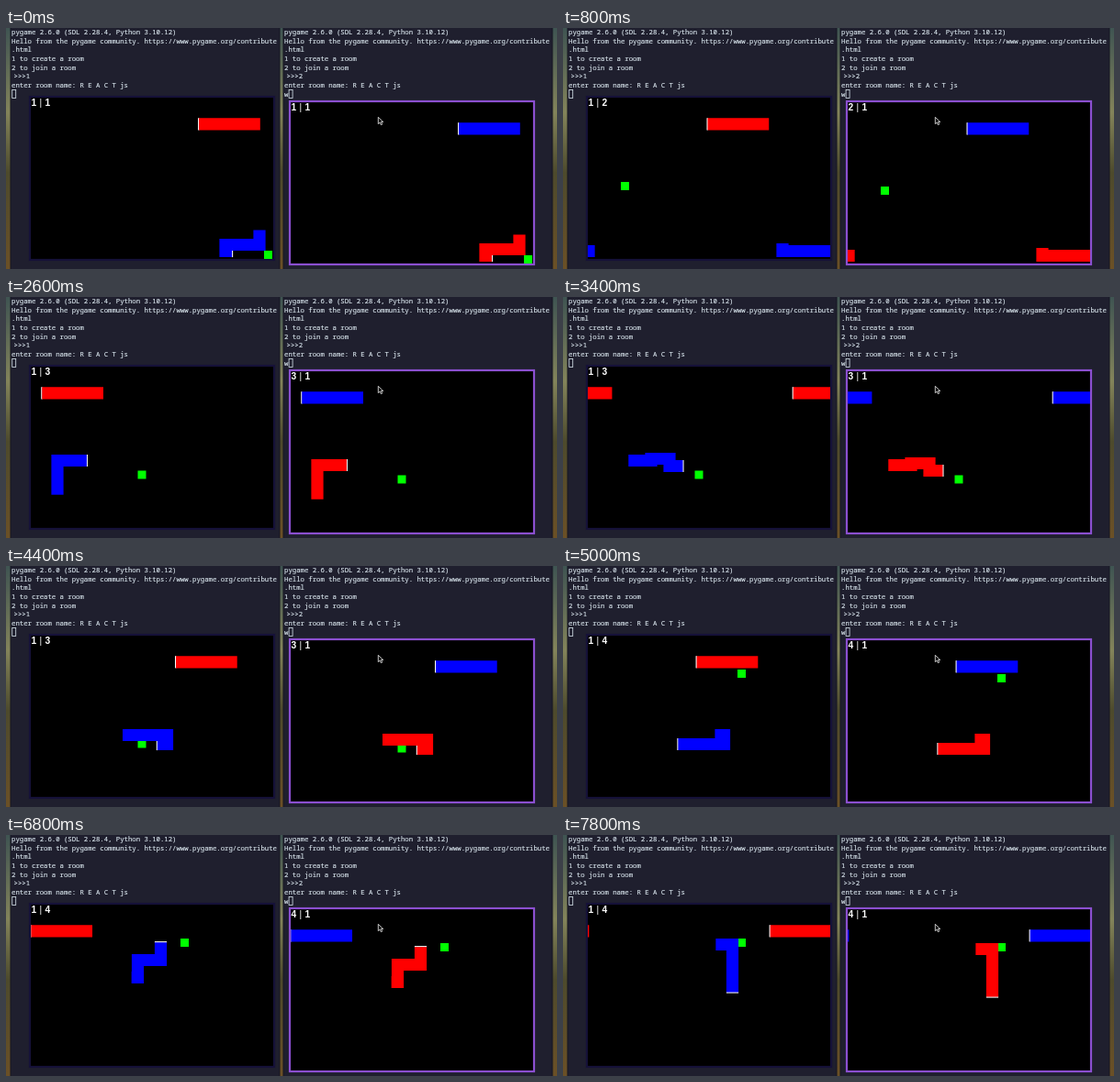
Recreate the animation shown at these times as an HTML page. Size 600 by 263 pixels, loop 8000 ms.

```html
<!DOCTYPE html>
<html lang="en">
<head>
<meta charset="utf-8">
<title>Two player snake</title>
<style>
  html, body { margin: 0; width: 100%; height: 100%; overflow: hidden; background: #1f1f2e; }
  svg { display: block; width: 100vw; height: 100vh; }
  .term { font: 7.31px "Noto Sans Mono", "DejaVu Sans Mono", monospace; fill: #d8e4ec; stroke: #d8e4ec; stroke-width: .14; white-space: pre; }
  .score { font: bold 10.2px "Liberation Sans", Arial, sans-serif; letter-spacing: .2px; fill: #fff; white-space: pre; }
  .bar { font-weight: normal; }
</style>
</head>
<body>
<svg viewBox="0 0 600 263" preserveAspectRatio="none">
  <defs>
    <linearGradient id="wall" x1="0" y1="0" x2="0" y2="1">
      <stop offset="0" stop-color="#3f5452"/>
      <stop offset=".35" stop-color="#83845a"/>
      <stop offset=".6" stop-color="#4d4a2c"/>
      <stop offset="1" stop-color="#6b5026"/>
    </linearGradient>
    <clipPath id="field"><rect x="27" y="76" width="264" height="176"/></clipPath>
  </defs>
  <rect width="600" height="263" fill="url(#wall)"/>
  <g id="terminals"></g>
  <g id="games"></g>
  <path d="M405.3 97.3v7.4l1.8-1.6 1.2 2.6 1.4-.6-1.2-2.6h2.3z" fill="#111" stroke="#eee" stroke-width=".8"/>
</svg>
<script>
const LOOP = 8000, STEP = 200;
const LEFT = 27, WIDTH = 264, SPEED = 65.7, SIZE = 13.2;
const RED = "#f00", BLUE = "#00f";
const $ = id => document.getElementById(id);

// Steering: direction and distance, all at the same speed
const MOVES = "D46 L37 D7 R81 U65 R40 U2 R20 D8 R59.5 D10 L46 U36 L3 U3 R17 U19 R25 U17 R16 D60";
const LEAD = 90.5; // distance already covered when the loop starts
const TURN = { U: [0, -1], D: [0, 1], L: [-1, 0], R: [1, 0] };

let at = { x: 276, y: 190.5, d: 0 };
const route = [at, ...MOVES.split(" ").map(move => {
  const [ux, uy] = TURN[move[0]], n = +move.slice(1);
  return at = { x: at.x + ux * n, y: at.y + uy * n, d: at.d + n };
})];

// Food: x, y, second it appears
const foods = [[281, 243, 0], [63, 168, .6], [143.5, 189.5, 2.4], [190, 113, 4.8]];

function pointAt(d) {
  const i = route.findIndex(p => p.d > d), a = route[i - 1], b = route[i];
  const k = (d - a.d) / (b.d - a.d);
  return [a.x + (b.x - a.x) * k, a.y + (b.y - a.y) * k];
}

// Points from head back to tail
function trail(d, length) {
  const corners = route.filter(p => p.d > d - length && p.d < d).map(p => [p.x, p.y]);
  return [pointAt(d), ...corners.reverse(), pointAt(d - length)];
}

function snake(points, color) {
  const [[hx, hy], [nx, ny]] = points;
  const home = -Math.floor((hx - SIZE / 2 - LEFT) / WIDTH) * WIDTH;
  const ux = Math.sign(hx - nx), uy = Math.sign(hy - ny), r = SIZE / 2, lead = r + .3;
  const cx = hx + ux * lead, cy = hy + uy * lead;
  const eye = `<path d="M${cx - uy * r} ${cy - ux * r}L${cx + uy * r} ${cy + ux * r}" stroke="#fff" stroke-width="1.5"/>`;
  const bodies = [-WIDTH, 0, WIDTH].map(dx =>
    `<polyline transform="translate(${dx} 0)" points="${points.join(" ")}" fill="none"
      stroke="${color}" stroke-width="${SIZE}" stroke-linecap="square"/>`);
  return `<g transform="translate(${home} 0)">${eye}${bodies.join("")}</g>`;
}

function terminal(x, choice, typed) {
  const lines = [
    "pygame 2.6.0 (SDL 2.28.4, Python 3.10.12)",
    "Hello from the pygame community. https://www.pygame.org/contribute",
    ".html", "1 to create a room", "2 to join a room", "&gt;&gt;&gt;" + choice,
    "enter room name: R E A C T js", typed
  ];
  const text = lines.map((s, i) =>
    `<text class="term" x="${x + (s.startsWith("&gt;") ? 2.5 : 0)}" y="${7 + i * 9.67}">${s}</text>`).join("");
  return `<rect x="${x - 1}" y="-2" width="293" height="267" fill="#1f1f2e" stroke="#171722"/>${text}
    <rect x="${x + .7 + typed.length * 4.39}" y="67.5" width="4" height="9" fill="none" stroke="#d8e4ec" stroke-width=".8"/>`;
}

function game(id, dx, dy, border) {
  return `<g transform="translate(${dx} ${dy})">
    <rect x="26" y="75" width="266" height="178" fill="#000" stroke="${border}" stroke-width="2.2"/>
    <g id="play${id}" clip-path="url(#field)"></g>
    <text id="score${id}" class="score" x="27.6" y="85"></text></g>`;
}

$("terminals").innerHTML = terminal(6, 1, "") + terminal(303, 2, "w");
$("games").innerHTML = game(0, 0, 0, "#151138") + game(1, 283, 5, "#8b4fd0");

const score = (a, b) => `${a} <tspan class="bar">|</tspan> ${b}`;

function draw(ms) {
  const time = Math.floor(ms / STEP) * STEP / 1000, gone = SPEED * time;
  const points = foods.filter(f => f[2] <= time).length;
  const [fx, fy] = foods[points - 1];
  const x = 216.7 - gone;
  const cruiser = [[x, 104.8], [x + 53.5, 104.8]];
  const hunter = trail(LEAD + gone, 53 + points);
  const food = `<rect x="${fx}" y="${fy}" width="9" height="9" fill="#0f0"/>`;
  $("play0").innerHTML = food + snake(cruiser, RED) + snake(hunter, BLUE);
  $("play1").innerHTML = food + snake(cruiser, BLUE) + snake(hunter, RED);
  $("score0").innerHTML = score(1, points);
  $("score1").innerHTML = score(points, 1);
}

const start = performance.now();
function tick() {
  draw((performance.now() - start) % LOOP);
  requestAnimationFrame(tick);
}
tick();
</script>
</body>
</html>
```
